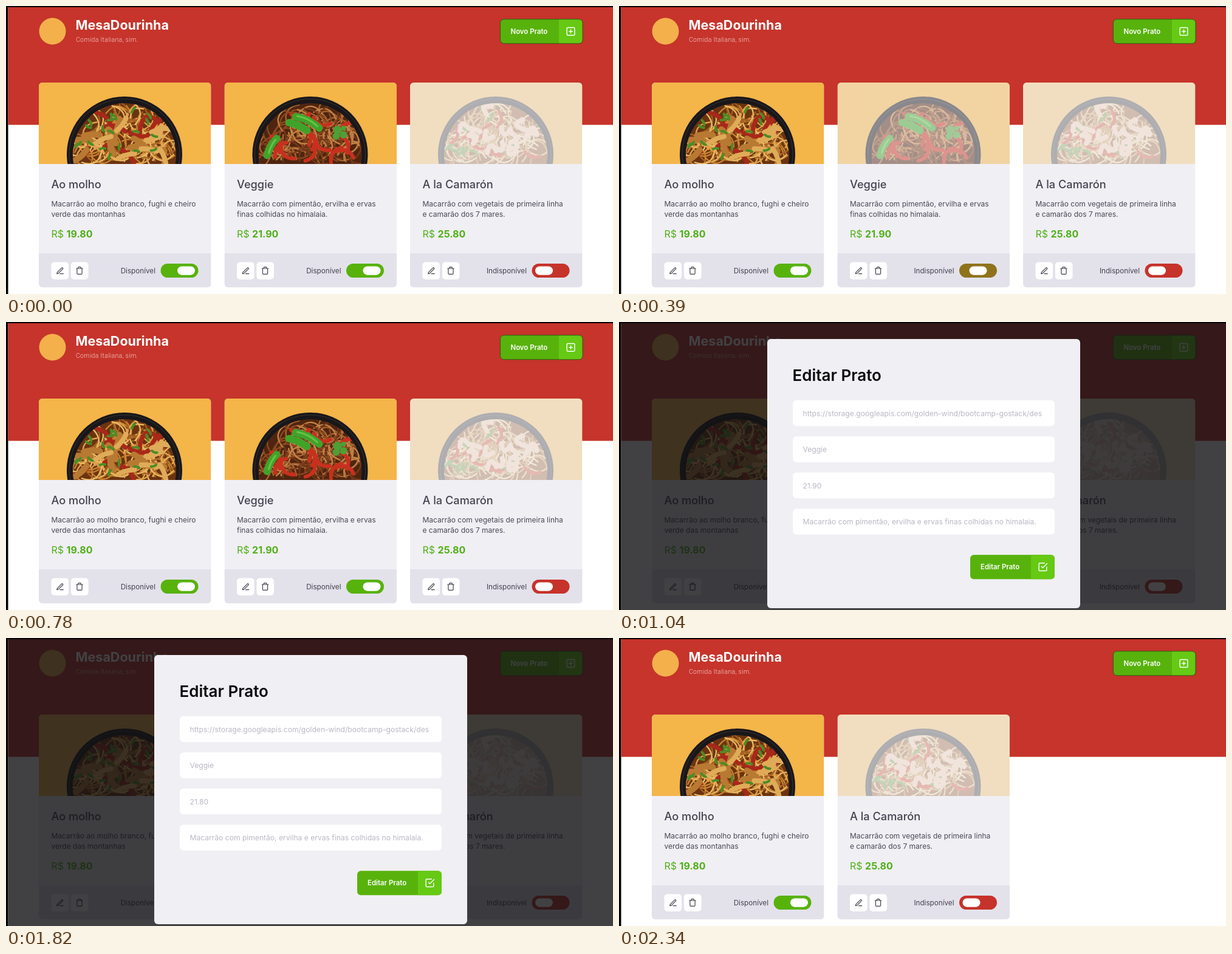
Write an HTML page that moves like this. It is 999 px wide and 474 px high and loops after 2600 ms.

```html
<!DOCTYPE html>
<html lang="pt">
<head>
<meta charset="utf-8">
<title>Cardápio</title>
<style>
  html, body { margin: 0; width: 100%; height: 100%; overflow: hidden; background: #000; }
  svg { display: block; width: 999px; height: 474px; font-family: Inter, sans-serif; }
  .brand { font-size: 21.5px; font-weight: 700; fill: #fff; }
  .tagline { font: 300 10.5px Roboto, sans-serif; letter-spacing: .3px; fill: #f6cfca; }
  .action { font-size: 11.4px; font-weight: 600; fill: #fff; }
  .name { font-size: 18.2px; font-weight: 500; fill: #44424f; }
  .about { font-size: 12px; fill: #4a4855; }
  .price { font-size: 16px; fill: #4fb017; }
  .price tspan { font-weight: 700; }
  .state { font-size: 11.7px; fill: #44424f; text-anchor: end; }
  .heading { font-size: 26px; font-weight: 600; fill: #0b0b0d; }
  .field { font-size: 12.1px; fill: #b9b8c6; }
  .icon { fill: none; stroke: #3d3d4d; stroke-width: 2; stroke-linecap: round; stroke-linejoin: round; }
  .light { stroke: #fff; }
</style>
</head>
<body>
<svg id="stage" viewBox="0 0 999 474"></svg>
<script>
const LOOP = 2600;
const COLUMNS = [54, 359.5, 665];
const GREEN = [88, 178, 12], RED = [198, 51, 42];

const steps = [
  { at: 0 },
  { at: 260, off: 0.05, label: 'Indisponível' },
  { at: 390, off: 0.5, label: 'Indisponível' },
  { at: 520, off: 1, label: 'Indisponível' },
  { at: 650, off: 0.5 },
  { at: 780 },
  { at: 1040, modal: true },
  { at: 1560, modal: true, typed: '21.8' },
  { at: 1820, modal: true, typed: '21.80' },
  { at: 2080, price: '21.80' },
  { at: 2340, removed: true }
];

const dishes = [
  {
    name: 'Ao molho', price: '19.80', seed: 7,
    about: ['Macarrão ao molho branco, fughi e cheiro', 'verde das montanhas'],
    base: '#6b3310', noodles: ['#c9832f', '#dfa24a', '#a45f22', '#e8b964'],
    extras: [
      { n: 9, color: '#a8281a', width: 7, length: 34, bend: 10 },
      { n: 9, color: '#b87a32', width: 10, length: 26, bend: 3 },
      { n: 9, color: '#e0ab58', width: 8, length: 26, bend: 3 },
      { n: 20, color: '#4b8c25', width: 4, length: 9, bend: 2 }
    ]
  },
  {
    name: 'Veggie', price: '21.90', seed: 23,
    about: ['Macarrão com pimentão, ervilha e ervas', 'finas colhidas no himalaia.'],
    base: '#4f250f', noodles: ['#a86531', '#8c481f', '#c48446', '#74381a'],
    extras: [{ n: 13, color: '#c8301e', width: 6, length: 30, bend: 14 }],
    garnish: `
      <g fill="none" stroke="#3fa32a" stroke-width="12" stroke-linecap="round">
        <path d="M117 56Q140 60 156 75M106 66Q120 68 136 79M70 120Q74 104 86 92"/>
        <path d="M120 55Q140 59 153 72M73 116Q76 104 84 94" stroke="#66c246" stroke-width="3"/>
      </g>
      <g fill="#4d9f36"><circle cx="186" cy="78" r="7"/><circle cx="196" cy="86" r="6"/>
        <circle cx="184" cy="88" r="6"/><circle cx="196" cy="75" r="4"/></g>`
  },
  {
    name: 'A la Camarón', price: '25.80', seed: 41, off: 1,
    about: ['Macarrão com vegetais de primeira linha', 'e camarão dos 7 mares.'],
    base: '#8a4a1c', noodles: ['#e6c07c', '#d6a052', '#f2d9a4', '#c08540'],
    extras: [
      { n: 8, color: '#cf3d20', width: 5, length: 26, bend: 10 },
      { n: 12, color: '#5e9a34', width: 4, length: 14, bend: 4 },
      { n: 14, color: '#f3c9a8', width: 8, length: 15, bend: 20 }
    ]
  }
];

const box = (x, y, w, h, r, fill, more = '') =>
  `<rect x="${x}" y="${y}" width="${w}" height="${h}" rx="${r}" fill="${fill}" ${more}/>`;
const text = (x, y, cls, body) => `<text x="${x}" y="${y}" class="${cls}">${body}</text>`;
const icon = (x, y, size, d, cls = '') =>
  `<path class="icon ${cls}" transform="translate(${x} ${y}) scale(${size / 24})" d="${d}"/>`;

const PENCIL = 'M12 20h9M16.5 3.5a2.1 2.1 0 0 1 3 3L7 19l-4 1 1-4z';
const TRASH = 'M3 6h18M19 6v14a2 2 0 0 1-2 2H7a2 2 0 0 1-2-2V6M8 6V4a2 2 0 0 1 2-2h4a2 2 0 0 1 2 2v2';
const PLUS = 'M5 3h14a2 2 0 0 1 2 2v14a2 2 0 0 1-2 2H5a2 2 0 0 1-2-2V5a2 2 0 0 1 2-2zM12 8v8M8 12h8';
const CHECK = 'M9 11l3 3L22 4M21 12v7a2 2 0 0 1-2 2H5a2 2 0 0 1-2-2V5a2 2 0 0 1 2-2h11';

function random(seed) {
  return () => (seed = (seed * 16807) % 2147483647) / 2147483647;
}

// Bent strokes scattered over the bowl
function strands(rnd, { n, color, width, length, bend }) {
  let d = '';
  for (let i = 0; i < n; i++) {
    const a = -Math.PI * rnd(), r = 80 * Math.sqrt(rnd());
    const x = 141 + r * Math.cos(a), y = 122 + r * Math.sin(a);
    const turn = rnd() * Math.PI * 2, c = Math.cos(turn), s = Math.sin(turn);
    const half = length / 2, side = rnd() < 0.5 ? -bend : bend;
    const points = [x - c * half, y - s * half, x - s * side, y + c * side, x + c * half, y + s * half];
    const [x1, y1, cx, cy, x2, y2] = points.map(v => v.toFixed(1));
    d += `M${x1} ${y1}Q${cx} ${cy} ${x2} ${y2}`;
  }
  return `<path d="${d}" fill="none" stroke="${color}" stroke-width="${width}" stroke-linecap="round"/>`;
}

function photo({ seed, base, noodles, extras, garnish = '' }) {
  const rnd = random(seed * 977);
  const layers = [0, 1].flatMap(() => noodles).map(color =>
    strands(rnd, { n: 16, color, width: 2.4, length: 38, bend: 22 }));
  return box(0, 0, 283.5, 134, 0, '#f4b549') +
    `<circle cx="141" cy="118" r="95" fill="#19171a"/>
     <circle cx="141" cy="118" r="91" fill="none" stroke="#37332f"/>
     <g clip-path="url(#food)">${box(50, 30, 182, 104, 0, base)}${layers.join('')}
     ${extras.map(e => strands(rnd, e)).join('')}${garnish}</g>`;
}

function card(dish) {
  return `<g class="card"><g clip-path="url(#card)">
    ${box(0, 0, 283.5, 337, 0, '#f0eff4')}
    <g class="photo" clip-path="url(#photo)">${photo(dish)}</g>
    ${box(0, 281, 283.5, 56, 0, '#e3e2eb')}</g>
    ${text(20.5, 173.5, 'name', dish.name)}
    ${text(20.5, 203.5, 'about', dish.about[0])}
    ${text(20.5, 221, 'about', dish.about[1])}
    ${text(20.5, 254.5, 'price', `R$ <tspan>${dish.price}</tspan>`)}
    ${box(20.5, 295.5, 28.5, 28.5, 5, '#fff')}${icon(28, 303, 14, PENCIL)}
    ${box(53, 295.5, 28.5, 28.5, 5, '#fff')}${icon(60, 302.5, 14, TRASH)}
    ${text(192, 314, 'state', '')}
    ${box(200.5, 298, 62, 23, 11.5, '#000', 'class="track"')}
    ${box(0, 302.5, 29, 14.2, 7.1, '#fff', 'class="knob"')}
  </g>`;
}

const button = (x, y, w, label, d, edge = '') =>
  box(x, y, w, 40, 6, '#58b20c') +
  `<path d="M${x + w - 39} ${y}h33a6 6 0 0 1 6 6v28a6 6 0 0 1-6 6h-33z" fill="#66c914"/>` +
  (edge && box(x, y, w, 40, 6, 'none', `stroke="${edge}"`)) +
  text(x + 17, y + 24, 'action', label) +
  icon(x + w - 28, y + 11.5, 17, d, 'light');

const fields = [
  'https://storage.googleapis.com/golden-wind/bootcamp-gostack/des',
  'Veggie', '21.90', dishes[1].about.join(' ')
];
const field = (value, i) => {
  const y = 128.8 + i * 59.5;
  return box(286, y, 431, 42.5, 6, '#fff') + text(302.5, y + 26, 'field', value);
};

const stage = document.getElementById('stage');
stage.innerHTML = `
  <defs>
    <clipPath id="card">${box(0, 0, 283.5, 337, 6, '#000')}</clipPath>
    <clipPath id="photo">${box(0, 0, 283.5, 134, 0, '#000')}</clipPath>
    <clipPath id="food"><circle cx="141" cy="119" r="85"/></clipPath>
  </defs>
  ${box(3.5, 2, 995.5, 472, 0, '#fff')}
  ${box(3.5, 2, 995.5, 193.6, 0, '#c6342b')}
  <circle cx="76.5" cy="41.5" r="22" fill="#f3b04b"/>
  ${text(114.5, 39, 'brand', 'MesaDourinha')}
  ${text(115, 58.5, 'tagline', 'Comida Italiana, sim.')}
  ${button(813.5, 21.8, 135.5, 'Novo Prato', PLUS, '#2c5a12')}
  ${dishes.map(card).join('')}
  <g id="modal">
    ${box(3.5, 2, 995.5, 472, 0, '#121214', 'fill-opacity=".8"')}
    ${box(244, 28, 515, 443, 6, '#f0eff4')}
    ${text(285.5, 97, 'heading', 'Editar Prato')}
    ${fields.map(field).join('')}
    ${button(578, 383.2, 139, 'Editar Prato', CHECK)}
  </g>`;

const cards = [...stage.querySelectorAll('.card')].map(el => ({
  el,
  photo: el.querySelector('.photo'),
  price: el.querySelector('.price tspan'),
  state: el.querySelector('.state'),
  track: el.querySelector('.track'),
  knob: el.querySelector('.knob')
}));
const modal = document.getElementById('modal');
const priceField = modal.querySelectorAll('.field')[2];

function place(c, column) {
  c.el.setAttribute('transform', `translate(${COLUMNS[column]} 126)`);
}

// The knob slides evenly while the photo fades with an ease-out
function toggle(c, off, label) {
  const color = GREEN.map((v, i) => Math.round(v + (RED[i] - v) * off));
  const fade = 1 - (1 - off) ** 2;
  c.photo.setAttribute('opacity', 1 - 0.7 * fade);
  c.track.setAttribute('fill', `rgb(${color})`);
  c.knob.setAttribute('x', 228 - 22 * off);
  c.state.textContent = label;
}

function show({ off = 0, label = 'Disponível', modal: open, typed = '21.90', price = '21.90', removed }) {
  toggle(cards[1], off, label);
  cards[1].price.textContent = price;
  cards[1].el.style.display = removed ? 'none' : '';
  place(cards[2], removed ? 1 : 2);
  modal.style.display = open ? '' : 'none';
  priceField.textContent = typed;
}

place(cards[0], 0);
place(cards[1], 1);
toggle(cards[0], 0, 'Disponível');
toggle(cards[2], 1, 'Indisponível');

const start = performance.now();
let current;
function tick() {
  const t = (performance.now() - start) % LOOP;
  const step = steps.filter(s => s.at <= t).pop();
  if (step !== current) show(current = step);
  requestAnimationFrame(tick);
}
tick();
</script>
</body>
</html>
```
